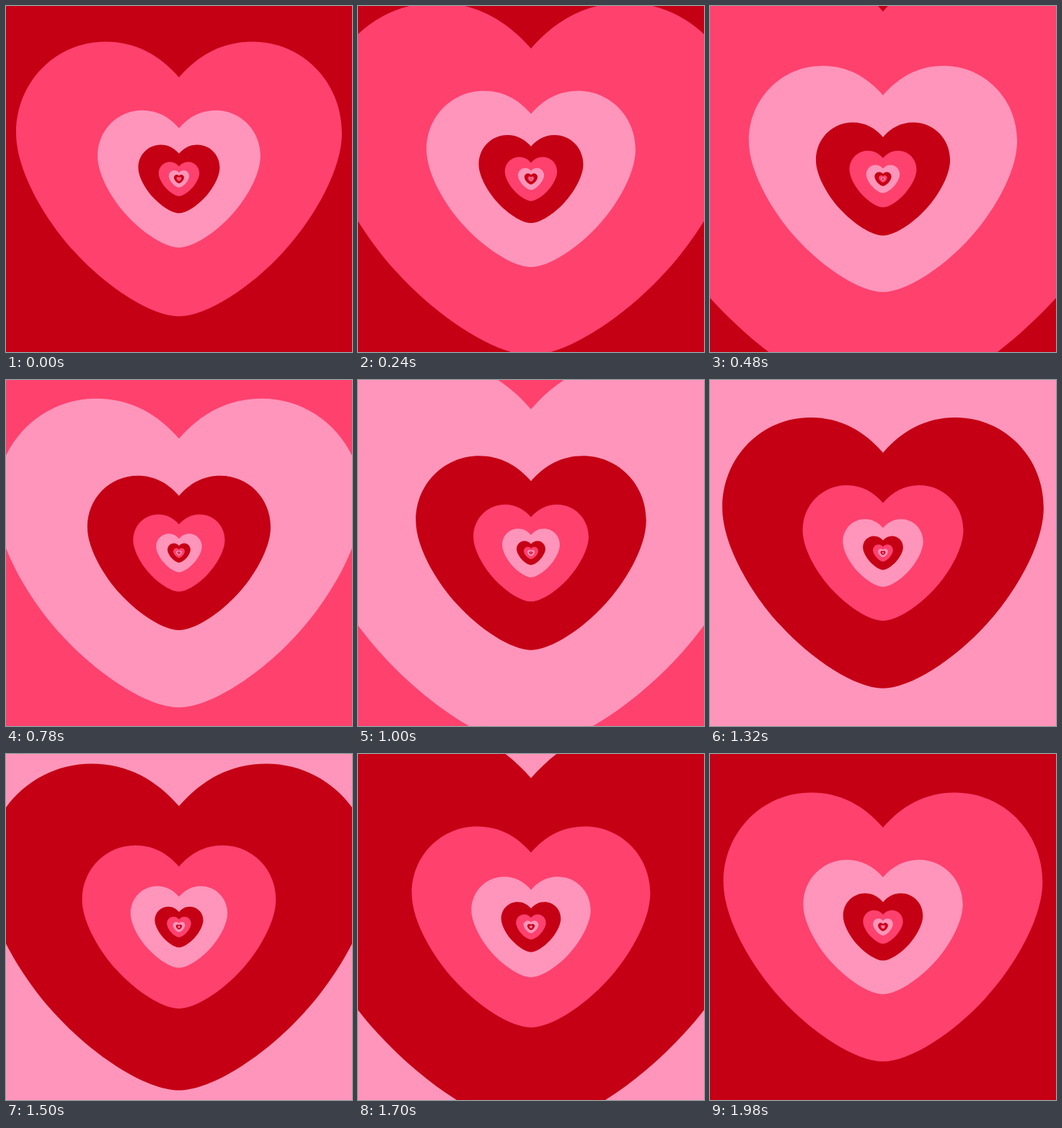
An HTML page that plays this animation: 480x480 px, repeating every 2 s.

```html
<!DOCTYPE html>
<html lang="en">
<head>
<meta charset="utf-8">
<title>Endless hearts</title>
<style>
html, body { margin: 0; width: 100%; height: 100%; overflow: hidden; background: #c50014; }
svg { display: block; width: 100%; height: 100%; }
</style>
</head>
<body>
<svg viewBox="-240 -240 480 480"></svg>
<script>
const LOOP = 2000, STEP = 20, DOUBLINGS = 3;
const COLORS = ['#ff416e', '#ff95ba', '#c50014'];
const FIRST = -3, LAST = 10;
const svg = document.querySelector('svg');

// Bézier points of the right side, from notch over lobe and flank to tip.
const right = [
  [0, -141],
  [27, -172], [60, -190.5], [102, -190.5],
  [170.5, -190.5], [226, -135], [226, -64],
  [226, -8], [180.7, 62.4], [145.7, 100.2],
  [99.7, 150.8], [38, 190.4], [0, 190.4]
];
const left = right.map(([x, y]) => [-x, y]).reverse();
const heartPath = `M${right[0]}C${[...right.slice(1), ...left.slice(1)].join(' ')}Z`;

const hearts = [];
for (let level = FIRST; level <= LAST; level++) {
  const node = document.createElementNS('http://www.w3.org/2000/svg', 'path');
  node.setAttribute('d', heartPath);
  node.setAttribute('fill', COLORS[(level - FIRST) % COLORS.length]);
  svg.append(node);
  hearts.push({ node, level });
}

// Each heart is half the size of the one around it; all grow exponentially.
function draw(ms) {
  const zoom = DOUBLINGS * Math.floor(ms / STEP) * STEP / LOOP;
  for (const { node, level } of hearts) {
    node.setAttribute('transform', `scale(${2 ** (zoom - level)})`);
  }
}

const start = performance.now();
function tick() {
  draw((performance.now() - start) % LOOP);
  requestAnimationFrame(tick);
}
draw(0);
requestAnimationFrame(tick);
</script>
</body>
</html>
```
